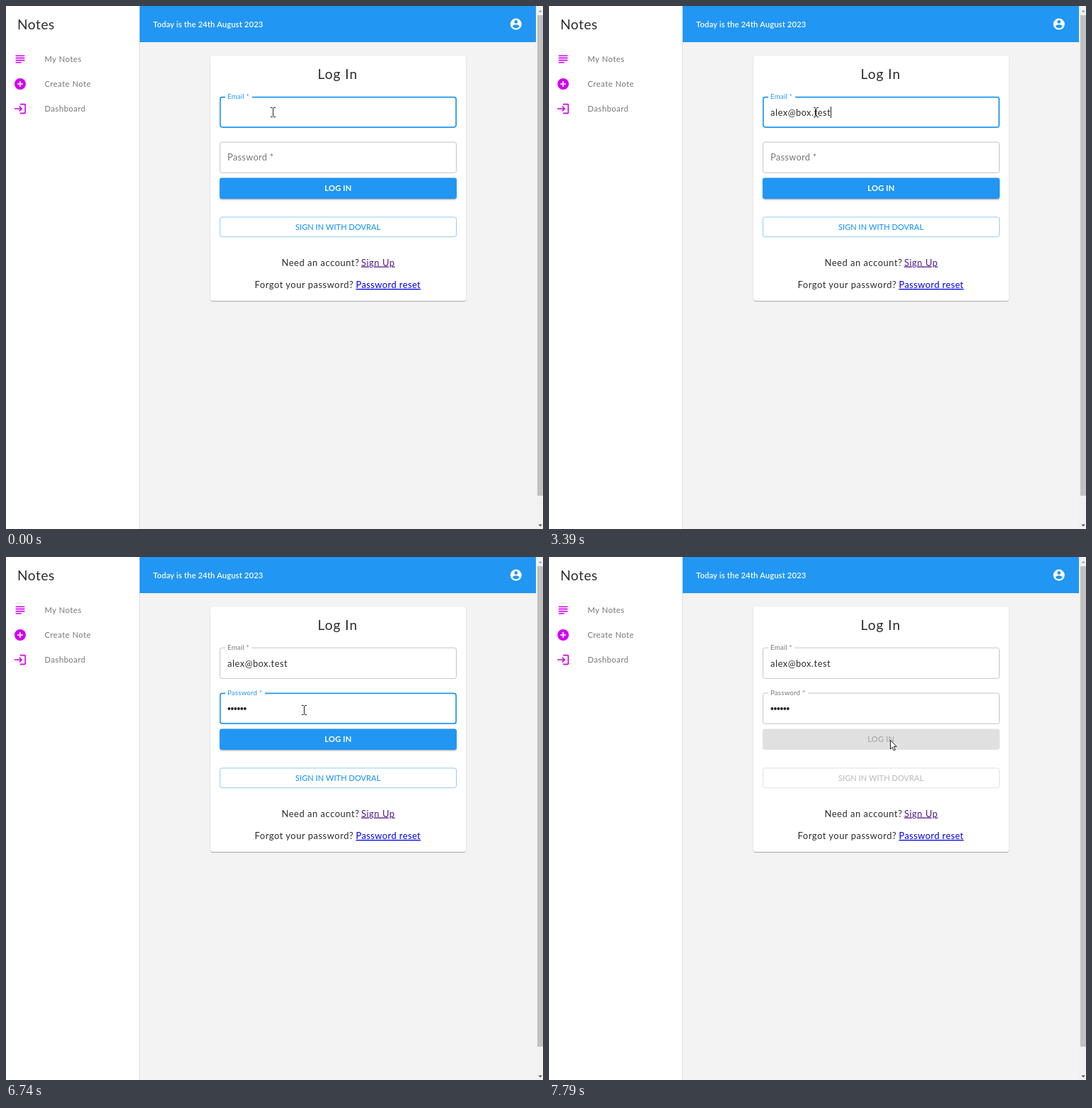
Recreate the animation shown at these times as an HTML page. Size 759 by 738 pixels, loop 8000 ms.

```html
<!DOCTYPE html>
<html lang="en">
<head>
<meta charset="utf-8">
<title>Log In</title>
<style>
  html, body { margin: 0; width: 100%; height: 100%; overflow: hidden; background: #f3f3f3; }
  body { position: relative; }
  div, svg { position: absolute; }
  svg { left: 0; top: 0; }
  text { font-family: Lato, "Open Sans", sans-serif; font-size: 13px; letter-spacing: .5px; fill: #2c2c2c; white-space: pre; }
  .title { font-size: 19.2px; }
  .menu { font-size: 11.3px; letter-spacing: .48px; fill: #757575; }
  .date { font-size: 11.2px; letter-spacing: .16px; font-weight: 600; fill: #fff; }
  .button { font-size: 11.1px; letter-spacing: 0; font-weight: 500; }
  .strong { font-size: 11.2px; letter-spacing: .15px; font-weight: 700; }
  .label { font-size: 12.8px; letter-spacing: .32px; }
  .input { font-size: 12.8px; letter-spacing: .55px; }
  .link { text-decoration: underline; }
  #card { left: 289px; top: 70px; width: 361px; height: 346px; background: #fff; border-radius: 3px;
    box-shadow: 0 1.6px .8px -.8px #0003, 0 .8px .8px #00000024, 0 .8px 2.4px #0000001f; }
  #shadow { left: 302px; top: 243px; width: 335px; height: 29px; border-radius: 3px; }
</style>
</head>
<body>
<div id="card"></div>
<div id="shadow"></div>
<svg width="759" height="738" viewBox="0 0 759 738">
  <path d="M0 0H188V738H0z" fill="#fff"/>
  <path d="M188 0h1V738h-1z" fill="#e0e0e0"/>
  <path d="M189 0H749V51H189z" fill="#2196f3"/>
  <path d="M749 0h10V738h-10z" fill="#f1f1f1"/>
  <path d="M751 13h8V691h-8z" fill="#c1c1c1"/>
  <path d="M752.5 8.5l2.7-3 2.7 3z" fill="#a3a3a3"/>
  <path d="M752.5 731.5l2.7 3 2.7-3z" fill="#505050"/>

  <text class="title" x="16" y="33">Notes</text>
  <g fill="#d000f0">
    <path transform="translate(10.4 65.4) scale(.8)" d="M4 5H20V7H4zM4 9H20V11H4zM4 13H20V15H4zM4 17H14V19H4z"/>
    <circle cx="20" cy="110" r="8"/>
    <path d="M19.2 106h1.6v3.2h3.2v1.6h-3.2v3.2h-1.6v-3.2h-3.2v-1.6h3.2z" fill="#fff"/>
    <path transform="translate(10.4 135.4) scale(.8)" d="M11 7 9.6 8.4l2.6 2.6H2v2h10.2l-2.6 2.6L11 17l5-5zm9 12h-8v2h8c1.1 0 2-.9 2-2V5c0-1.1-.9-2-2-2h-8v2h8z"/>
  </g>
  <text class="menu" x="54.5" y="79">My Notes</text>
  <text class="menu" x="54.5" y="114">Create Note</text>
  <text class="menu" x="54.5" y="149">Dashboard</text>

  <text class="date" x="208" y="30">Today is the 24th August 2023</text>
  <g transform="translate(711.2 16) scale(.8)">
    <circle cx="12" cy="12" r="10" fill="#fff"/>
    <path d="M12 5a3 3 0 1 1 0 6a3 3 0 1 1 0-6zm0 14.2c-2.5 0-4.71-1.28-6-3.22.03-1.99 4-3.08 6-3.08s5.97 1.09 6 3.08c-1.29 1.94-3.5 3.22-6 3.22z" fill="#2196f3"/>
  </g>

  <text class="title" x="440.5" y="103" style="letter-spacing:1px">Log In</text>
  <path id="emailBox" fill="none"/>
  <path id="passBox" fill="none"/>
  <text id="emailLabel" class="label">Email *</text>
  <text id="passLabel" class="label">Password *</text>
  <text id="email" class="input" x="313" y="155"></text>
  <g id="dots" fill="#212121"></g>
  <rect id="caret" width="1" height="16" fill="#212121"/>

  <rect id="login" x="301.9" y="242.5" width="335.1" height="29.6" rx="3"/>
  <text id="loginText" class="button strong" x="450.3" y="261">LOG IN</text>
  <rect id="altBox" x="302.4" y="297.9" width="334.2" height="27.8" rx="3"/>
  <text id="altText" class="button" x="409" y="316">SIGN IN WITH DOVRAL</text>

  <text x="389.5" y="366.5">Need an account?</text>
  <text class="link" x="502" y="366.5" style="fill:#551a8b">Sign Up</text>
  <text x="351.5" y="398">Forgot your password?</text>
  <text class="link" x="494.5" y="398" style="fill:#0000ee;letter-spacing:.38px">Password reset</text>

  <path id="beam" fill="none" stroke="#222" d="M-3.5 -6.5h2.5l1 1l1-1h2.5M0 -5.5V5.5M-3.5 6.5h2.5l1-1l1 1h2.5"/>
  <path id="arrow" fill="#fff" stroke="#222" stroke-linejoin="round" d="M.5 .5V13L3.4 10.3L5.4 15L7.5 14.1L5.5 9.5H9.3z"/>
</svg>
<script>
const LOOP = 8000, STEP = 70;
const ADDRESS = 'alex@box.test';
const EMAIL_KEYS = [70, 200, 400, 470, 1330, 1930, 2130, 2330, 2400, 2730, 2990, 3120, 3390];
const PASS_KEYS = [4860, 5080, 5260, 5590, 5790, 5940];
const CARET_OFF = [[0, 70], [1000, 1330], [1860, 1930], [3920, 3990], [4530, 4860], [6400, 6930], [7430, LOOP]];
const TAB = 3990, MOVE = 6670, PRESS = 7510;
const BLUE = [33, 150, 243], DARK_BLUE = [25, 118, 210], PALE_BLUE = [144, 203, 249];
const WHITE = [255, 255, 255], GREY = [224, 224, 224];

const $ = id => document.getElementById(id);
const clamp = v => Math.max(0, Math.min(1, v));
const smooth = v => { v = clamp(v); return v * v * (3 - 2 * v); };
const lerp = (a, b, p) => a + (b - a) * p;
const mix = (a, b, p) => a.map((v, i) => lerp(v, b[i], p));
const rgb = c => `rgb(${c.map(Math.round)})`;
const typed = (keys, t) => keys.filter(k => k <= t).length;
const hold = (t, start) => Math.floor((t - start) / STEP);
const set = (id, attrs) => {
  for (const name in attrs) $(id).setAttribute(name, attrs[name]);
};
// Rises while the pointer is inside and falls after it leaves
const hover = (t, enter, leave) => smooth((t - enter) / 250) - smooth((t - leave) / 250);

$('dots').innerHTML = PASS_KEYS.map((_, i) =>
  `<circle cx="${315.3 + 4.5 * i}" cy="214" r="1.9"/>`).join('');

function drawField(id, top, notchEnd, focused, hovered) {
  const w = focused ? 1.7 : 1, o = w / 2, r = 3;
  const l = 301.9 + o, right = 637 - o, y = top + o, b = top + 44.2 - o;
  const start = notchEnd ? 310 : l + r, end = notchEnd || l + r;
  const arc = (x, y) => `A${r} ${r} 0 0 1 ${x} ${y}`;
  set(id, {
    d: `M${end} ${y}H${right - r}${arc(right, y + r)}V${b - r}${arc(right - r, b)}` +
       `H${l + r}${arc(l, b - r)}V${y + r}${arc(l + r, y)}H${start}`,
    stroke: focused ? rgb(BLUE) : hovered ? '#212121' : '#c4c4c4',
    'stroke-width': w
  });
}

function drawLabel(id, y, scale, focused) {
  set(id, { transform: `translate(313 ${y}) scale(${scale})` });
  $(id).style.fill = focused ? rgb(BLUE) : '#777';
}

function drawPointer(t) {
  const k = hold(t, MOVE);
  const down = 1 - Math.pow(1 - clamp((k + 1) / 7), 1.57);
  const up = smooth((k - 6) / 5);
  const x = Math.round(377 + 107 * down - 2 * up);
  const y = Math.round(150 + 160 * down - 52 * up);
  const inField = y < 236;
  set('beam', { transform: `translate(${x + .5} ${y})`, visibility: inField ? 'visible' : 'hidden' });
  set('arrow', { transform: `translate(${x} ${y})`, visibility: inField ? 'hidden' : 'visible' });
}

function drawButtons(t) {
  const off = smooth((t - PRESS - 10) / 260);
  const over = clamp(hover(t, 6810, 6950) + smooth((t - 7370) / 250));
  const alt = hover(t, 7000, 7230);
  const shade = (a, b) => lerp(a, b, over).toFixed(2) + 'px';
  const alpha = a => `rgba(0,0,0,${(a * (1 - off)).toFixed(3)})`;
  $('shadow').style.boxShadow =
    `0 ${shade(2.4, 1.6)} ${shade(.8, 3.2)} ${shade(-1.6, -.8)} ${alpha(.2)},` +
    `0 ${shade(1.6, 3.2)} ${shade(1.6, 4)} ${alpha(.14)}, 0 .8px ${shade(4, 8)} ${alpha(.12)}`;
  set('login', { fill: rgb(mix(mix(BLUE, DARK_BLUE, over), GREY, off)) });
  $('loginText').style.fill = rgb(mix(WHITE, [166, 166, 166], off));
  $('loginText').style.fontWeight = off > .5 ? 500 : 700;
  $('altText').style.fill = rgb(mix(BLUE, [189, 189, 189], off));
  set('altBox', {
    fill: rgb(mix(WHITE, BLUE, .04 * alt)),
    stroke: rgb(mix(mix(PALE_BLUE, BLUE, alt), GREY, off))
  });
}

function draw(t) {
  const onEmail = t < TAB, onPass = t >= TAB && t < PRESS;
  const chars = typed(EMAIL_KEYS, t), dots = typed(PASS_KEYS, t);

  drawField('emailBox', 127.7, onEmail ? 348 : 347, onEmail, t < MOVE);
  drawLabel('emailLabel', 131, .75, onEmail);
  $('email').textContent = ADDRESS.slice(0, chars);

  const shrink = 1 - Math.pow(1 - clamp((hold(t, TAB) * STEP + 30) / 220), 3);
  const lift = onEmail ? 0 : shrink;
  drawField('passBox', 191.6, lift > .5 ? 366 : 0, onPass, false);
  drawLabel('passLabel', lerp(218, 195, lift), lerp(1, .75, lift), onPass);
  [...$('dots').children].forEach((dot, i) => dot.setAttribute('visibility', i < dots ? 'visible' : 'hidden'));

  const width = onEmail ? (chars ? $('email').getComputedTextLength() : 0) : 4.5 * dots;
  const hidden = CARET_OFF.some(([a, b]) => t >= a && t < b);
  set('caret', {
    x: Math.floor(313 + width), y: onEmail ? 142 : 206,
    visibility: hidden ? 'hidden' : 'visible'
  });

  drawButtons(t);
  drawPointer(t);
}

const begin = performance.now();
function tick() {
  draw((performance.now() - begin) % LOOP);
  requestAnimationFrame(tick);
}
tick();
</script>
</body>
</html>
```
